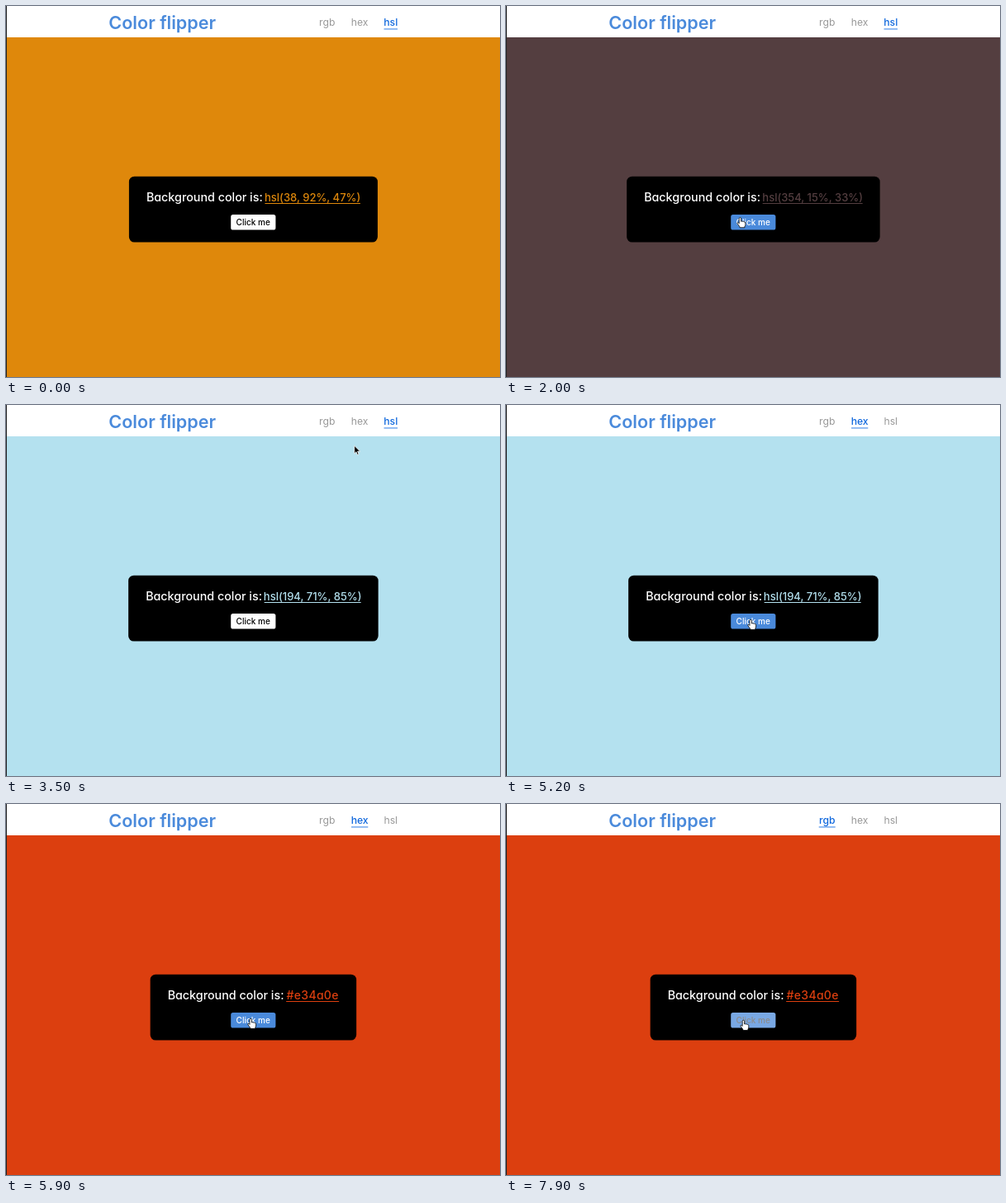
Animation, 598 px wide and 450 px high, one loop 8 s. Source, as an HTML page:

```html
<!DOCTYPE html>
<html lang="en">
<head>
<meta charset="utf-8">
<title>Color flipper</title>
<style>
  html, body { margin: 0; width: 100%; height: 100%; overflow: hidden; background: #fff; }
  svg { display: block; width: 598px; height: 450px; }
  text { font-family: Poppins, Inter, "Open Sans", sans-serif; font-feature-settings: "cv11"; white-space: pre; }
  .title { font-size: 21.6px; font-weight: 600; fill: #4a8adb; }
  .link { font-size: 12.2px; text-anchor: middle; fill: #999; }
  .active .link { font-weight: 500; fill: #1068dd; }
  .bar { fill: #3f87e8; visibility: hidden; }
  .active .bar { visibility: visible; }
  .label { font-size: 14.3px; font-weight: 500; fill: #fff; }
  .value { font-size: 13px; font-weight: 450; text-anchor: middle; }
  .value.hex { font-size: 14px; letter-spacing: 0.3px; }
  .press { font-size: 10px; font-weight: 500; text-anchor: middle; }
</style>
</head>
<body>
<svg viewBox="0 0 598 450">
  <rect width="598" height="450" fill="#fff"/>
  <rect id="page" y="38" width="598" height="412"/>
  <rect width="1" height="450" fill="#222"/>
  <text class="title" x="124.3" y="27.8">Color flipper</text>
  <g id="nav"></g>
  <rect id="card" y="206.7" height="79.9" rx="6.5"/>
  <text id="label" class="label" y="237">Background color is:</text>
  <text id="value" y="237"></text>
  <rect id="line" y="239" height="1"/>
  <rect id="button" x="272.2" y="253.1" width="54.2" height="18.5" rx="2.6"/>
  <text id="press" class="press" x="299.2" y="266">Click me</text>
  <path id="arrow" d="M0 0V9.6L2.2 7.5L3.7 11L5.4 10.3L3.9 6.9H7Z"
    fill="#000" stroke="#fff" stroke-width="0.8"/>
  <path id="hand" d="M-1.3 1a1.2 1.2 0 0 1 2.4 0V4.5q1-.6 2 .1q1-.4 1.8.4q1.3-.1 1.4 1.2V8.5q0 1-.9 2.2V12H-.3q-.3-1.3-1.6-2.8l-1.7-2.5q.2-1.3 1.4-.7l.9.9z"
    fill="#fff" stroke="#000" stroke-width="0.8"/>
</svg>
<script>
const LOOP = 8000, STEP = 100;
const CENTER = 299.4, PAD = 21, LABEL = 143.5;
const SVG = "http://www.w3.org/2000/svg";
const $ = id => document.getElementById(id);
const set = (el, attrs) => Object.entries(attrs).forEach(([k, v]) => el.setAttribute(k, v));

function add(parent, tag, attrs) {
  const el = parent.appendChild(document.createElementNS(SVG, tag));
  set(el, attrs);
  return el;
}

const links = [
  { name: "rgb", x: 378.7, w: 20, from: 7000 },
  { name: "hex", x: 418, w: 20.3, from: 3900 },
  { name: "hsl", x: 457.5, w: 16.5, from: 0 }
];

const looks = [
  { from: 0, color: "#df880b", text: "hsl(38, 92%, 47%)", w: 115.5 },
  { from: 1900, color: "#543e40", text: "hsl(354, 15%, 33%)", w: 121 },
  { from: 2700, color: "#b4e1ef", text: "hsl(194, 71%, 85%)", w: 117 },
  { from: 5300, color: "#dc3f0f", text: "#e34a0e", w: 64 }
];

// the pointer glides to each stop, then rests until the next trip
const entry = { x: 222, y: 438, at: 200 };
const trips = [
  { leave: 200, arrive: 1150, x: 300, y: 261 },
  { leave: 1300, arrive: 1700, x: 283.5, y: 256.8 },
  { leave: 2900, arrive: 3200, x: 419, y: 64 },
  { leave: 3400, arrive: 3700, x: 427, y: 20 },
  { leave: 4000, arrive: 4400, x: 352, y: 178 },
  { leave: 4500, arrive: 4900, x: 296.3, y: 260.5 },
  { leave: 5900, arrive: 6300, x: 384, y: 52 },
  { leave: 6500, arrive: 6700, x: 388, y: 20 },
  { leave: 7000, arrive: 7500, x: 331, y: 136 },
  { leave: 7600, arrive: 7900, x: 287.5, y: 262.5 }
];

function pointer(t) {
  if (t < entry.at) return null;
  let { x, y } = entry;
  for (const trip of trips) {
    const p = Math.min(1, Math.max(0, (t - trip.leave) / (trip.arrive - trip.leave)));
    x += (trip.x - x) * p;
    y += (trip.y - y) * p;
  }
  return { x, y };
}

const inside = (p, x, y, w, h) => p && p.x >= x && p.x <= x + w && p.y >= y && p.y <= y + h;
const onButton = p => inside(p, 272, 253, 54, 19);
const onLink = p => links.some(l => inside(p, l.x, 10, l.w, 18));
const mix = (a, b, p) => `rgb(${a.map((v, i) => Math.round(v + (b[i] - v) * p))})`;

for (const l of links) {
  l.group = add($("nav"), "g", {});
  add(l.group, "text", { class: "link", x: l.x + l.w / 2, y: 23.6 }).textContent = l.name;
  add(l.group, "rect", { class: "bar", x: l.x, y: 27.4, width: l.w, height: 1.1 });
}

function drawPage(t) {
  const { color, text, w } = looks.filter(s => s.from <= t).pop();
  const active = links.find(l => l.from <= t);
  for (const l of links) l.group.classList.toggle("active", l === active);

  const width = LABEL + w + 2 * PAD;
  const left = CENTER - width / 2;
  const x = left + PAD + LABEL;
  set($("page"), { fill: color });
  set($("card"), { x: left, width });
  set($("label"), { x: left + PAD });
  set($("value"), { x: x + w / 2, fill: color, class: text[0] === "#" ? "value hex" : "value" });
  set($("line"), { x, width: w, fill: color });
  $("value").textContent = text;
}

function drawPointer(t) {
  const tip = pointer(t);
  const now = onButton(tip), before = onButton(pointer(t - STEP));
  const hover = now ? (before ? 1 : 0.74) : (before ? 0.26 : 0);
  set($("button"), { fill: mix([255, 255, 255], [74, 138, 219], hover) });
  set($("press"), { fill: mix([0, 0, 0], [255, 255, 255], hover * hover) });

  const shape = tip && (now || onLink(tip) ? "hand" : "arrow");
  for (const id of ["hand", "arrow"]) set($(id), { visibility: id === shape ? "visible" : "hidden" });
  if (tip) set($(shape), { transform: `translate(${tip.x} ${tip.y})` });
}

const start = performance.now();
function tick() {
  const time = (performance.now() - start) % LOOP;
  const t = Math.floor(time / STEP) * STEP;
  drawPage(t);
  drawPointer(t);
  requestAnimationFrame(tick);
}
tick();
</script>
</body>
</html>
```
